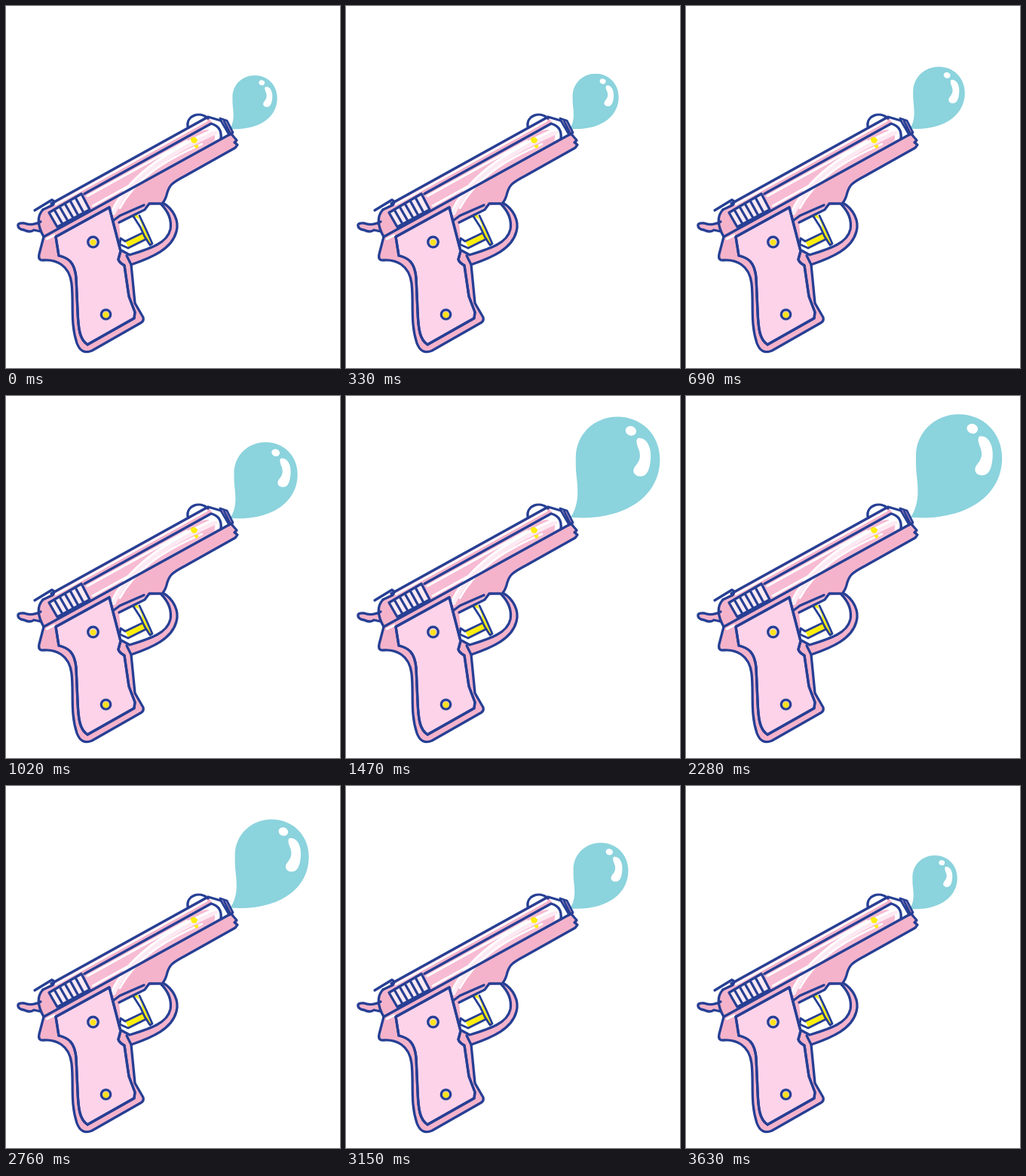
Recreate the animation shown at these times as an HTML page. Size 443x480 px, loop 3.66 s.

```html
<!DOCTYPE html>
<html lang="en">
<head>
<meta charset="utf-8">
<title>Bubble pistol</title>
<style>
  html, body { margin: 0; width: 100%; height: 100%; overflow: hidden; background: #fff; }
  svg { display: block; width: 100vw; height: 100vh; }
  .ink { fill: none; stroke: #263f94; stroke-width: 3.3; stroke-linecap: round; stroke-linejoin: round; }
  .shine { fill: none; stroke: #fff; stroke-width: 2.6; stroke-linecap: round; stroke-linejoin: round; }
  .thin { stroke-width: 2.8; }
  .soft { stroke: #fdeaf3; stroke-width: 5; }
  .wide { stroke-width: 4; }
</style>
</head>
<body>
<svg viewBox="0 0 443 480">
  <g id="bubble">
    <path fill="#8bd3dd" d="M298 161C308 145 309 130 306 105C305 96 305 88 305 80C305 48 330 24 362 24C394 24 419.500 48 419.500 82C419.500 130 375 166 298 161Z"/>
    <ellipse fill="#fff" cx="380" cy="43" rx="7.500" ry="6.500" transform="rotate(20 380 43)"/>
    <path fill="#fff" d="M390 53C402 52 408 66 407 80C406 96 402 105 393 105C384 105 381 97 386 91C392 84 394 78 391 69C388 62 386 55 390 53Z"/>
  </g>

  <!-- Body colours -->
  <path fill="#f5b3cb" d="M50 306L42 284Q46 270 60 262L268 147L285 151L293 153L301 168L307 181L304 188L238 225C219 235 217 238 214 247Q212 256 208 261C222 269 230 285 226 299C220 322 195 333 166 343L171 394L182 413Q183 418 179 420L114 457Q100 463 94 447C85 420 90 395 87 368C84 343 66 336 50 337Q43 338 44 329Z"/>
  <path fill="#f7bcd3" d="M103 250L272 156Q288 160 285 177L112 271Z"/>
  <path fill="#f5b3cb" d="M46 286Q34 292 24 288Q15 287 16 292Q17 296 24 297Q32 301 37 297L48 299Z"/>
  <path fill="#fff" d="M150 287L188 265L205 262C216 273 220 284 218 296C214 315 190 322 164 330L153 324Z"/>
  <path fill="#fff" d="M269 149L286 152L298 168L286 176Q287 164 274 155Z"/>
  <path fill="#fff" d="M247 168L272 156Q285 161 284 175L276 179Q281 165 266 164Z"/>

  <!-- Highlights -->
  <g class="shine">
    <path d="M66 263L266 152M108 252L240 179M115 265L180 229M220 238L236 229L300 192M54 309L64 304"/>
    <path class="wide" d="M136 285C150 240 195 200 276 164"/>
    <path class="soft" d="M143 275C162 232 207 200 278 168"/>
    <path d="M151 268C172 230 207 206 260 183"/>
  </g>
  <path fill="#fdee0e" d="M245 176Q249 171 254 177Q254 182 249 182Q245 181 245 176ZM249 185L255 184Q256 188 252 189Z"/>

  <!-- Grip -->
  <path id="grip" fill="#fdd3ea" d="M66 306L137 267L152 325L149 336Q150 340 157 344L163 385L171 406L170 414L108 449C98 442 96 430 95 405L93 360C91 340 83 334 70 331Z"/>
  <path fill="#f7bed4" d="M69 308L86 299Q76 312 89 331L91 341Q84 332 73 329Z"/>
  <path fill="#0fd6e2" d="M88 311Q78 312 77 321Q79 333 91 339Z"/>
  <path class="shine" d="M72 307L135 272L148 326M154 347L159 386L167 407L166 412L110 444"/>

  <!-- Trigger -->
  <path fill="#fdee0e" d="M169 279L174 276L180 290L181 301L158 312L163 321L185 310L191 317L193 316L185 298L178 283Z"/>
  <path class="ink thin" d="M169 279L178 293L184 306L191 317L194 315L186 297L177 278M158 312L181 301M162 321L186 309M158 312L152 308L151 316L162 321"/>

  <!-- Outlines -->
  <g class="ink">
    <path d="M38 271L61 257Q66 259 62 264L49 270M60 262L268 147L285 152M241 160C239 145 257 139 268 149"/>
    <path d="M49 270Q37 283 50 306L299 169M46 286Q34 292 24 288Q15 287 16 292Q17 296 24 297Q32 301 37 297L46 299"/>
    <path d="M104 249L272 156Q287 160 285 176"/>
    <path class="thin" d="M284 149L293 152L301 168L296 171L285 152M289 152L297 168"/>
    <path d="M299 170L306 178L303 181L307 184L304 188L238 225C219 235 217 238 214 247Q212 256 208 261"/>
    <path d="M50 306L44 329Q42 338 50 337C66 336 84 343 87 368C90 395 85 420 94 447Q100 463 114 457L179 420Q183 418 182 413L171 394L166 343"/>
    <use href="#grip" fill="none"/>
    <path d="M208 261C222 269 230 285 226 299C220 322 195 333 166 343L160 331"/>
    <path d="M150 287L184 270L190 262L205 262C216 273 220 284 218 296C214 315 190 322 164 330L153 324M143 284L151 278L183 264"/>
  </g>
  <g class="ink">
    <path fill="#fde9f2" d="M57 274L100 249L111 270L68 293Z"/>
    <path d="M64 270L75 289M71 266L82 285M78 262L89 281M85 258L96 278M92 254L103 274"/>
    <use href="#outline"/>
    <path d="M66 306L137 267L152 325L149 336Q150 340 157 344L163 385L171 406L170 414L108 449C98 442 96 430 95 405L93 360C91 340 83 334 70 331Z"/>
  </g>
  <g class="ink" style="fill:#fdd3ea">
    <circle cx="115.500" cy="313" r="6.800"/>
    <circle cx="132.500" cy="409" r="6.200"/>
  </g>
  <g fill="#fde21c">
    <circle cx="115.500" cy="313.500" r="4"/>
    <circle cx="132.500" cy="409.500" r="4"/>
  </g>
</svg>
<script>
const LOOP = 3660, HALF = LOOP / 2;
const NOZZLE = [295.5, 165];
const DRAWN_SCALE = 1.93, GROWTH = 0.984;
const bubble = document.getElementById('bubble');

const bezier = (u, a, b) => 3 * (1 - u) ** 2 * u * a + 3 * (1 - u) * u * u * b + u ** 3;

// Cubic ease (.65, 0, .6, 1), solved by bisection
function ease(x) {
  let low = 0, high = 1;
  for (let i = 0; i < 24; i++) {
    const mid = (low + high) / 2;
    if (bezier(mid, 0.65, 0.6) < x) low = mid; else high = mid;
  }
  return bezier(low, 0, 1);
}

function draw(now) {
  const t = now % LOOP;
  const swell = t < HALF ? ease(t / HALF) : 1 - ease(t / HALF - 1);
  const scale = (1 + GROWTH * swell) / DRAWN_SCALE;
  const [x, y] = NOZZLE;
  bubble.setAttribute('transform', `translate(${x} ${y}) scale(${scale}) translate(${-x} ${-y})`);
}

const start = performance.now();
function tick() {
  draw(performance.now() - start);
  requestAnimationFrame(tick);
}
tick();
</script>
</body>
</html>
```
